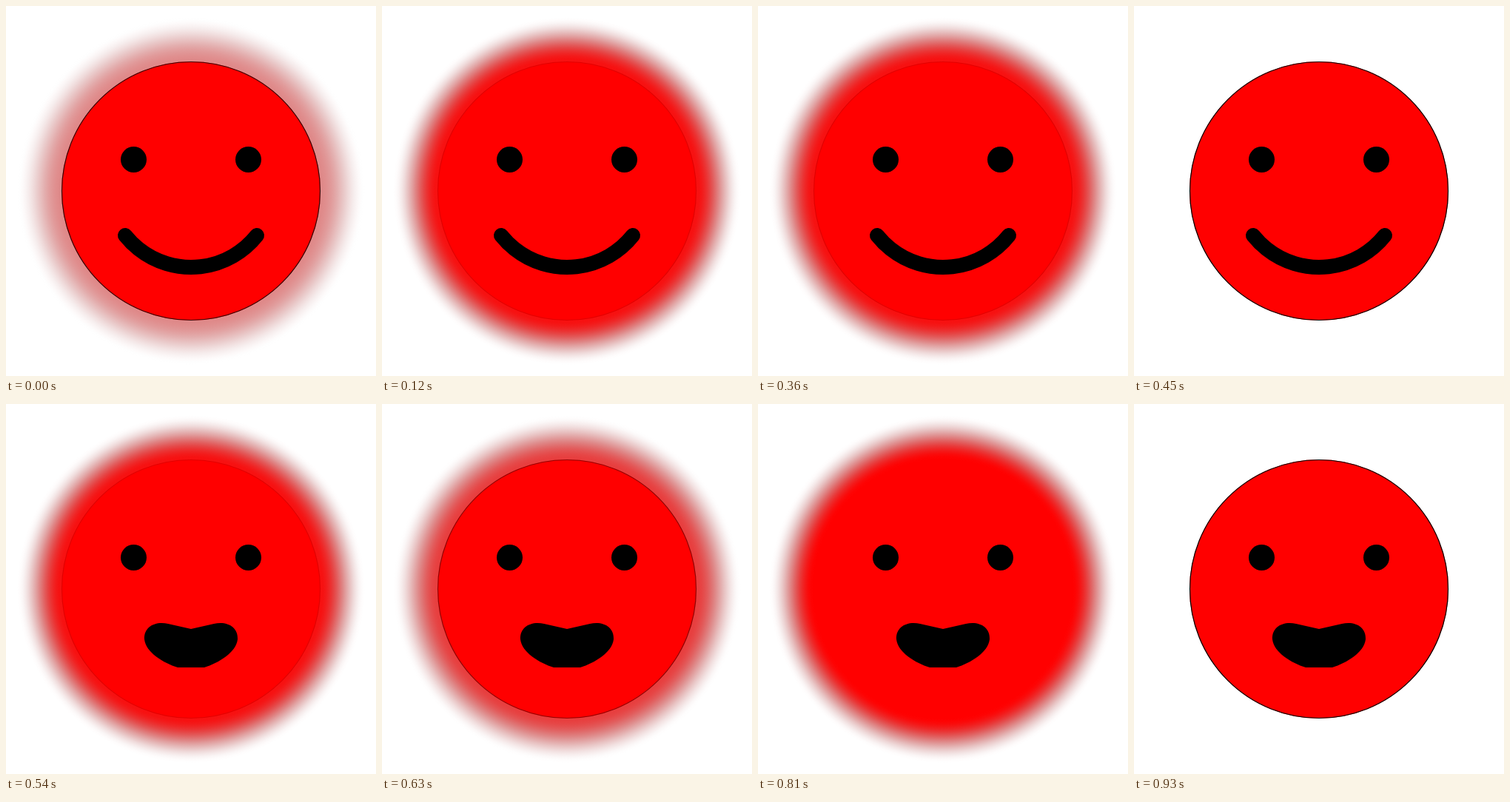
These frames come from a looping animation (500x500 px, 960 ms). An HTML page with a canvas:

```html
<!DOCTYPE html>
<html lang="en">
<head>
<meta charset="utf-8">
<title>Glowing face</title>
<style>
  html, body { margin: 0; width: 100%; height: 100%; overflow: hidden; background: #fff; }
  canvas { display: block; }
</style>
</head>
<body>
<canvas width="500" height="500"></canvas>
<script>
const ctx = document.querySelector('canvas').getContext('2d');
const LOOP = 960, STEP = 30, PULSE = 240;
const CENTER = 250, RADIUS = 175, REACH = 60;
const openMouth = new Path2D(
  'M250 304 L219 297 C203 293 186 300 187 318 C189 336 213 350 232 356 ' +
  'L268 356 C287 350 311 336 313 318 C314 300 297 293 281 297 Z');

function disc(x, y, r, fill) {
  ctx.fillStyle = fill;
  ctx.beginPath();
  ctx.arc(x, y, r, 0, 2 * Math.PI);
  ctx.fill();
}

// Red over white that darkens a little where it is half transparent
function glowColor(a) {
  const red = 255 * (1 - 0.5 * a * (1 - a)), rest = 255 * (1 - a);
  return `rgb(${red}, ${rest}, ${rest})`;
}

function drawGlow(level) {
  const outer = RADIUS + REACH, stops = 16;
  const gradient = ctx.createRadialGradient(CENTER, CENTER, RADIUS, CENTER, CENTER, outer);
  for (let i = 0; i <= stops; i++) {
    const u = i / stops;
    gradient.addColorStop(u, glowColor(level * (1 - u * u * (3 - 2 * u))));
  }
  disc(CENTER, CENTER, outer, gradient);
}

function drawSmile() {
  const r = 113.6, half = Math.asin(89 / r);
  ctx.lineWidth = 20;
  ctx.lineCap = 'round';
  ctx.strokeStyle = '#000';
  ctx.beginPath();
  ctx.arc(CENTER, 353 - r, r, Math.PI / 2 - half, Math.PI / 2 + half);
  ctx.stroke();
}

function draw(time) {
  const t = Math.floor(time % LOOP / STEP) * STEP;
  const phase = (t + STEP) % PULSE / PULSE;
  const level = Math.sin(Math.PI * phase) ** 0.8;

  ctx.fillStyle = '#fff';
  ctx.fillRect(0, 0, 500, 500);
  drawGlow(level);

  disc(CENTER, CENTER, RADIUS, '#f00');
  ctx.lineWidth = 1.2;
  ctx.strokeStyle = `rgba(0, 0, 0, ${1 - level ** 2})`;
  ctx.beginPath();
  ctx.arc(CENTER, CENTER, RADIUS - 0.5, 0, 2 * Math.PI);
  ctx.stroke();

  for (const x of [172.5, 327.5]) disc(x, 207.5, 17.5, '#000');
  if (t < LOOP / 2) drawSmile();
  else ctx.fill(openMouth);
}

const start = performance.now();
function tick() {
  draw(performance.now() - start);
  requestAnimationFrame(tick);
}
tick();
</script>
</body>
</html>
```
